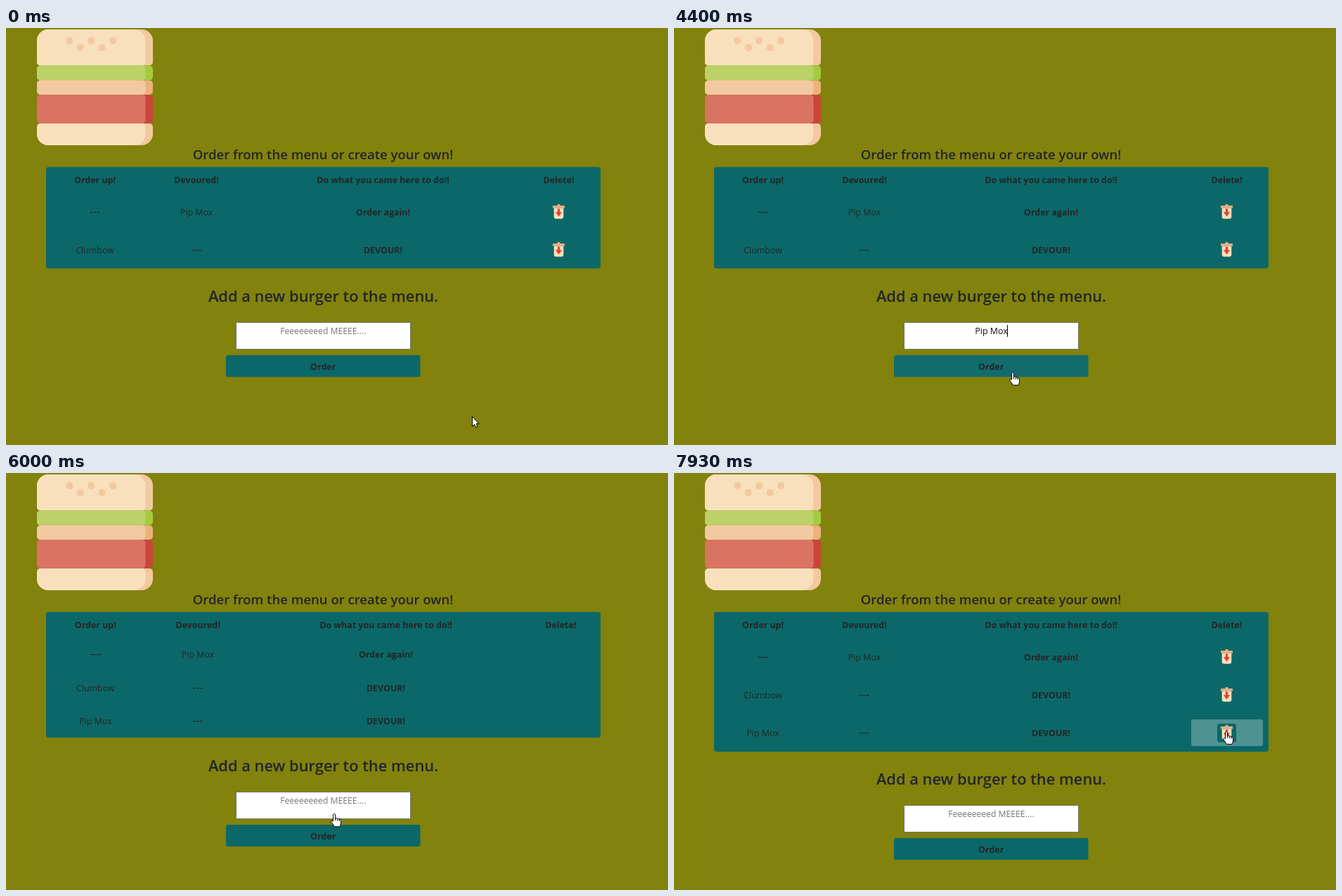
An HTML page with a canvas for the animation above (8000 ms loop, 942 px wide and 594 px high).

```html
<!DOCTYPE html>
<html lang="en">
<head>
<meta charset="utf-8">
<title>Burger menu</title>
<style>
html, body { margin: 0; width: 100%; height: 100%; overflow: hidden; background: #82820d; }
canvas { display: block; }
</style>
</head>
<body>
<canvas id="stage" width="942" height="594"></canvas>
<script>
const ctx = document.getElementById('stage').getContext('2d');
const LOOP = 8000;
const OLIVE = '#82820d', TEAL = '#0c6868', INK = '#212529';
const SANS = '"Open Sans", "Noto Sans", sans-serif';
const BODY = '400 12.4px ' + SANS, BOLD = '700 12.45px ' + SANS, DASH = '400 15.5px ' + SANS;
const COMBO = 'Pip Mox', SINGLE = 'Clumbow', NONE = '---';

const keyTimes = [1870, 2130, 2270, 2530, 2870, 3000, 3270];
const focusAt = 730, pressAt = 5130, reloadAt = 6000, iconsAt = 6070;

// Pointer path: time, x, y, shape used from that time on
const path = [
  [0, 663, 553, 'arrow'], [10, 663, 553, 'arrow'], [130, 645, 522, 'arrow'],
  [270, 600, 457, 'arrow'], [325, 560, 444, 'beam'], [470, 468.5, 437, 'beam'],
  [4140, 468.5, 437, 'beam'], [4270, 472, 443, 'beam'], [4340, 478, 459, 'arrow'],
  [4374, 480, 468, 'hand'], [4400, 482, 490, 'hand'], [4430, 483, 500, 'arrow'],
  [4530, 480, 518, 'arrow'], [4700, 472, 512, 'arrow'], [4814, 468, 496, 'hand'],
  [4870, 467, 485.5, 'hand'], [4930, 467, 485, 'hand'], [6670, 467, 485, 'hand'],
  [6730, 467, 487, 'beam'], [6800, 468, 488, 'beam'], [6940, 468, 488, 'beam'],
  [7060, 478, 472, 'arrow'], [7150, 488, 446, 'beam'], [7220, 499, 420, 'arrow'],
  [7315, 512, 374, 'hand'], [7330, 515, 367, 'hand'], [7450, 557, 350, 'arrow'],
  [7570, 665, 345, 'arrow'], [7650, 737, 356, 'hand'], [7800, 778, 367, 'hand'],
  [7930, 786, 367.5, 'hand']
];

const shapes = {
  arrow: new Path2D('M.5.5V14.5L3.6 11.6 5.8 16 8 15 6 10.7H9.9Z'),
  hand: new Path2D('M-1.5 11V1.6Q0-.8 1.5 1.6V6.8Q4 5.6 4.3 7.6Q6.8 6.6 7 8.4Q9.6 7.8 9.6 10.4V13.5Q9.4 16 8 18.8H.2Q-.8 16-4.4 11.8Q-4.6 9.2-1.5 11Z'),
  fingers: new Path2D('M1.5 6.8V10M4.3 7.6V10.5M7 8.4V11'),
  beam: new Path2D('M-3-6.5H-1L0-5.5 1-6.5H3M0-5.5V5.5M-3 6.5H-1L0 5.5 1 6.5H3')
};

function box(x, y, w, h, r, color) {
  ctx.fillStyle = color;
  ctx.beginPath();
  ctx.roundRect(x, y, w, h, r);
  ctx.fill();
}

function label(str, x, y, font = BODY, color = INK) {
  ctx.font = font;
  ctx.fillStyle = color;
  ctx.fillText(str, x, y);
}

function fade(t, start, end) {
  const ramp = from => {
    const p = Math.min(1, Math.max(0, (t - from) / 130));
    return p * p * (3 - 2 * p);
  };
  return Math.max(0, ramp(start) - ramp(end));
}

const glow = amount => `rgba(255,255,255,${0.276 * amount})`;

function layer(y, h, r, front, side) {
  box(44, y, 165, h, r, side);
  box(44, y, 154.5, h, r, front);
}

function burger() {
  layer(2, 51.5, [16, 16, 5, 5], '#f9e0bd', '#f2c9a0');
  layer(53.5, 21, 5, '#bcd168', '#a3cb3d');
  layer(74.5, 20.5, 5, '#f2c9a0', '#ebb27c');
  layer(95, 41, 5, '#d97462', '#c9453a');
  layer(136, 31, [5, 5, 16, 16], '#f9e0bd', '#f2c9a0');
  ctx.fillStyle = '#f2c9a0';
  for (let i = 0; i < 5; i++) {
    ctx.beginPath();
    ctx.arc(90.3 + i * 15.45, i % 2 ? 28 : 18, 5.2, 0, 7);
    ctx.fill();
  }
}

function bin(x, y) {
  box(x - 13.5, y - 13, 27, 26.5, 3, TEAL);
  box(x - 2, y - 11, 4, 3, 1, '#e9ae86');
  box(x - 8.5, y - 9, 17, 3.6, 0.5, '#e9ae86');
  box(x - 6.8, y - 5.4, 13.6, 15.2, [0, 0, 3, 3], '#f9dfbd');
  ctx.fillStyle = '#d9482f';
  ctx.fill(new Path2D(`M${x - 1.7} ${y - 4.5}h3.4v4.8h3l-4.7 6.2-4.7-6.2h3z`));
}

function cell(str, x, y) {
  label(str, x, y + 4.5, str === NONE ? DASH : BODY);
}

function table(t) {
  const bare = t >= reloadAt && t < iconsAt;
  const grown = t >= reloadAt;
  const cols = bare ? [127.3, 273, 540.5, 789.3] : [126.5, 271, 536.5, 786.5];
  const rows = bare ? [258.5, 306, 353.7] : [262, 316, 370];
  const bottom = bare ? 377 : grown ? 397 : 342.5;

  box(57, 198, 789, bottom - 198, 4, TEAL);
  ['Order up!', 'Devoured!', 'Do what you came here to do!!', 'Delete!']
    .forEach((s, i) => label(s, cols[i], 221, BOLD));

  const items = [[NONE, COMBO], [SINGLE, NONE], [COMBO, NONE]];
  items.slice(0, grown ? 3 : 2).forEach(([ready, eaten], i) => {
    const y = rows[i];
    if (i === 2) {
      box(352, y - 19, 369, 38, 3, glow(fade(t, 7315, 7440)));
      box(736, y - 19, 102, 38, 3, glow(fade(t, 7645, LOOP)));
    }
    cell(ready, cols[0], y);
    cell(eaten, cols[1], y);
    label(i ? 'DEVOUR!' : 'Order again!', cols[2], y + 4.5, BOLD);
    if (!bare) bin(cols[3], y);
  });
}

function form(t) {
  const dy = t < reloadAt ? 0 : t < iconsAt ? 34.5 : 54.2;
  const sent = t >= reloadAt;
  ctx.save();
  ctx.translate(0, Math.round(dy));
  label('Add a new burger to the menu.', 451.5, 390, '600 21.85px ' + SANS);

  const over = (t >= 325 && t < 4340) || (t >= 6730 && t < 7060);
  box(327, 419, 249, 39, 0, over ? '#222' : '#767676');
  box(328, 420, 247, 37, 0, '#fff');

  const typed = sent ? 0 : keyTimes.filter(k => t >= k).length;
  const text = COMBO.slice(0, typed);
  if (typed) label(text, 451.5, 436, BODY, '#111');
  else label('Feeeeeeeed MEEEE....', 451.3, 436, '400 12.15px ' + SANS, '#757575');

  if (t >= focusAt && t < pressAt) {
    const since = t - (typed ? keyTimes[typed - 1] : focusAt);
    if (Math.floor(since / 500) % 2 === 0) {
      ctx.font = BODY;
      const x = Math.round(451.3 + ctx.measureText(text).width / 2);
      box(x, 423, 1, 17, 0, '#000');
    }
  }

  const ring = fade(t, 5080, reloadAt);
  if (!sent && ring) {
    box(310.7, 463.4, 281, 36.4, 5, `rgba(0,123,255,${0.25 * ring})`);
  }
  box(313, 466, 276.5, 31, 3, TEAL);
  const hover = sent ? 0 : Math.max(fade(t, 4374, 4430), fade(t, 4814, LOOP));
  box(313, 466, 276.5, 31, 3, glow(hover));
  label('Order', 451.2, 486.5, BOLD);
  ctx.restore();
}

function pointer(t) {
  let i = path.length - 1;
  while (path[i][0] > t) i--;
  const [t0, x0, y0, kind] = path[i];
  const [t1, x1, y1] = path[i + 1] || [LOOP, x0, y0];
  const p = (t - t0) / (t1 - t0);
  ctx.save();
  ctx.translate(x0 + (x1 - x0) * p, y0 + (y1 - y0) * p);
  ctx.strokeStyle = '#000';
  ctx.lineWidth = 1;
  ctx.lineJoin = 'round';
  if (kind !== 'beam') {
    ctx.fillStyle = '#fff';
    ctx.fill(shapes[kind]);
  }
  ctx.stroke(shapes[kind]);
  if (kind === 'hand') ctx.stroke(shapes.fingers);
  ctx.restore();
}

function draw(t) {
  ctx.fillStyle = OLIVE;
  ctx.fillRect(0, 0, 942, 594);
  ctx.textAlign = 'center';
  burger();
  label('Order from the menu or create your own!', 451, 186.5, '600 18.55px ' + SANS);
  table(t);
  form(t);
  pointer(t);
}

let start;
function tick(now) {
  start ??= now;
  const step = Math.floor(((now - start) % LOOP + 5) * 0.015);
  draw(Math.round(step * 20 / 3) * 10 % LOOP);
  requestAnimationFrame(tick);
}
draw(0);
requestAnimationFrame(tick);
</script>
</body>
</html>
```
